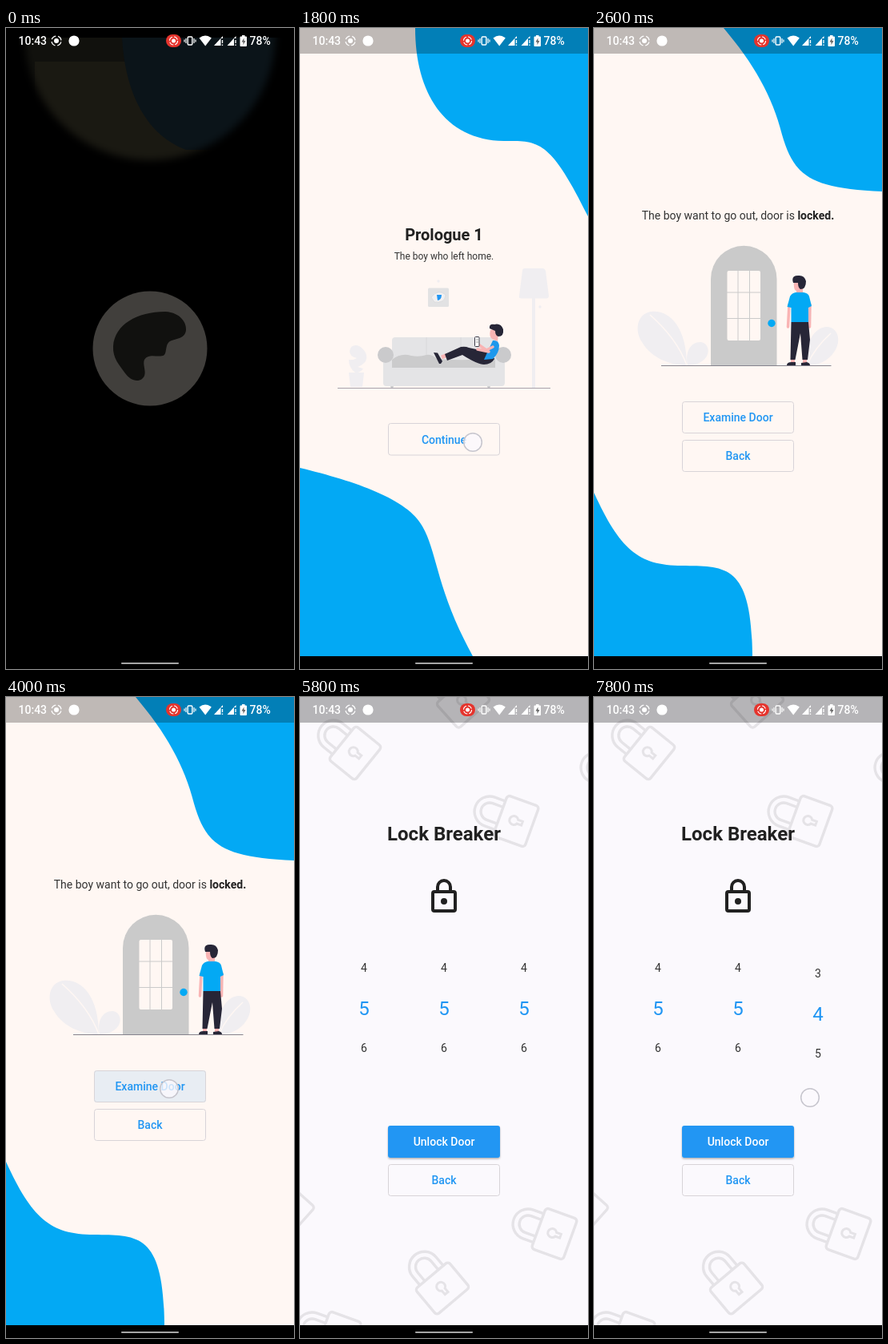
An HTML page that plays this animation: 360x800 px, repeating every 8 s.

```html
<!DOCTYPE html>
<html lang="en">
<head>
<meta charset="utf-8">
<title>Escape story</title>
<style>
html, body { margin: 0; width: 100%; height: 100%; overflow: hidden; background: #000; }
svg { display: block; width: 100vw; height: 100vh; }
text { font-family: Roboto, "Liberation Sans", sans-serif; }
.mid text { text-anchor: middle; }
.label { font-size: 14px; font-weight: 500; fill: #2196f3; }
.box { fill: none; stroke: #d8d4d8; }
.sky { fill: #03a9f4; }
.dark { fill: #272637; }
.skin { fill: #f9b4b4; }
.pale { fill: #f0eef1; }
.line { fill: none; }
</style>
</head>
<body>
<svg viewBox="0 0 360 800" preserveAspectRatio="none">
  <defs>
    <clipPath id="wheel"><rect x="40" y="313" width="280" height="150"/></clipPath>
    <filter id="soft" x="-20%" y="-20%" width="140%" height="140%"><feGaussianBlur stdDeviation="5"/></filter>
    <mask id="glow"><circle cx="180" cy="8" r="157" fill="#fff" filter="url(#soft)"/></mask>
    <filter id="lift" x="-10%" y="-10%" width="120%" height="140%"><feDropShadow dx="0" dy="1.5" stdDeviation="1.2" flood-opacity=".3"/></filter>
    <path id="topBlob" d="M144 0C144 80 180 140 255 141C298 141 312 138 360 235V0Z"/>
    <g id="padlock" fill="none" stroke="#e5e3e7" stroke-width="3.4">
      <rect x="-27" y="-21" width="54" height="42" rx="4"/>
      <path d="M-19-21v-14a19 19 0 0 1 38 0v14M-11-21v-14a11 11 0 0 1 22 0v14"/>
      <path d="M-2.5 2a5.5 5.5 0 1 1 5 0v6h-5z" stroke-width="3"/>
    </g>
  </defs>
  <rect width="360" height="800"/>

  <g id="splash">
    <g mask="url(#glow)">
      <rect y="12" width="360" height="180" fill="#11110d"/>
      <rect x="36" y="42" width="324" height="150" fill="#1a1912"/>
      <path d="M145 12C149 85 178 135 225 152H360V12Z" fill="#0b1419"/>
    </g>
    <circle cx="180" cy="400" r="71.5" fill="#413f3c"/>
    <path d="M134 397C136 370 164 354 199 354C219 355 226 369 225 377C224 388 213 387 205 391C198 395 202 408 196 409C188 411 178 406 173 414C170 421 178 432 170 438C163 443 154 438 149 431C142 421 133 412 134 397Z" fill="#11110f"/>
  </g>

  <g id="intro" class="mid">
    <rect width="360" height="784" fill="#fff7f3"/>
    <use href="#topBlob" class="sky"/>
    <path class="sky" d="M0 549C70 566 135 588 153 622C172 655 170 700 216 784H0Z"/>
    <text x="180" y="265" font-size="20" font-weight="700" fill="#212121">Prologue 1</text>
    <text x="180" y="288.500" font-size="12" fill="#333">The boy who left home.</text>

    <g class="pale">
      <path d="M281 300H303Q306 300 307 303L311 334Q311 337.500 308 337.500H277Q273 337.500 274 334L278 303Q278 300 281 300Z"/>
      <rect x="290" y="337" width="4" height="112"/>
      <circle cx="300" cy="348" r="1.700"/>
      <circle cx="173" cy="316" r="1.700"/>
      <path d="M64 398Q71 393 78 400Q86 408 82 416Q78 421 72 423L79 425Q75 431 69 430Q61 424 61 414Q66 415 71 412Q62 410 62 403Z"/>
      <path d="M61 430H80L78 448H63Z"/>
    </g>
    <rect x="160" y="324.500" width="26" height="23.500" rx="1.500" fill="#e2e2e3"/>
    <path d="M164 336Q173 325 182 333Q181 344 168 342Z" fill="#f1f0f1" stroke="#d3d3d5" stroke-width=".6"/>
    <path d="M171 333H177Q177 339 172 340Z" fill="#2196f3"/>
    <g fill="#e4e4e6">
      <rect x="115" y="386" width="130" height="42" rx="4"/>
      <path d="M158 386v24M201 386v24" stroke="#d6d6d8" stroke-width=".8"/>
      <path d="M115 414Q126 405 139 409Q149 411 158 408Q165 407 171 413Q207 416 245 412V424H115Z" fill="#cbcbcc"/>
      <path d="M104 408H115V424H244V408H256V443Q256 447 252 447H108Q104 447 104 443Z"/>
      <g fill="#cacacc"><circle cx="107" cy="408" r="10"/><circle cx="254" cy="408" r="10"/>
      <path d="M113 447h4l-1 3h-2zM234 447h4l-1 3h-2z"/></g>
    </g>
    <path d="M47 449.500H313" stroke="#a7a2ac"/>
    <path d="M177 411L184 408" stroke="#f9b4b4" stroke-width="5"/>
    <path class="dark" d="M167 405L172 405.500L178 416L176 419H174Z"/>
    <path class="dark" d="M181 407L201 398Q207 397 211 399L239 405L243 413Q239 420 230 420Q222 420 203 408L184 415Z"/>
    <path class="skin" d="M238 377Q244 374 248 382L247 391L240 388Q236 385 238 377Z"/>
    <path class="dark" d="M237 375Q236 369 243 370Q251 368 254 376Q255 385 248 385Q244 384 244 378Z"/>
    <path class="sky" style="fill:#1e98ec" d="M241 390Q248 389 249 396Q249 406 241 413L230 414L234 405Z"/>
    <path d="M241 398L233 402L223 395M236 404L222 401" class="line" stroke="#f9b4b4" stroke-width="3.500" stroke-linejoin="round" stroke-linecap="round"/>
    <rect x="218.500" y="385.500" width="5.500" height="12" rx="1" fill="#fff" stroke="#3b3a47" stroke-width="1"/>
    <path d="M220 389h3M220 392h3" stroke="#777" stroke-width=".7"/>

    <rect id="introTap" x="110" y="493.500" width="140" height="40" rx="3" fill="#2196f3"/>
    <rect class="box" x="110.500" y="493.500" width="139" height="39.500" rx="3"/>
    <text class="label" x="180" y="518.500">Continue</text>
  </g>

  <g id="door" class="mid">
    <rect width="360" height="784" fill="#fff7f3"/>
    <path class="sky" d="M162 0C200 45 223 85 235 133C250 185 270 200 360 204V0Z"/>
    <path class="sky" d="M0 580C32 650 55 671 110 671C165 672 197 668 198 784H0Z"/>
    <text x="180" y="239" font-size="14" fill="#333">The boy want to go out, door is <tspan font-weight="700" fill="#212121">locked.</tspan></text>
    <g class="pale">
      <path d="M116 421C116 373 94 351 71 354C54 357 50 377 60 392C71 411 94 421 116 421Z"/>
      <path d="M117 421C113 403 122 391 134 392C143 394 145 404 140 411C135 418 126 421 117 421Z"/>
      <path d="M266 421C262 394 276 373 291 373C306 374 309 391 301 403C293 416 280 421 266 421Z"/>
    </g>
    <path d="M70 358Q104 388 116 421M296 381Q276 399 266 421" class="line" stroke="#fff7f3" stroke-width="1.500"/>
    <path d="M146 421V313a41 41 0 0 1 82.500 0V421Z" fill="#cacaca"/>
    <rect x="166.500" y="303" width="41.500" height="87" rx="2" fill="#fff7f3"/>
    <path d="M180 303v87M194.500 303v87M166 330h42M166 362.500h42" stroke="#cacaca"/>
    <circle class="sky" cx="222" cy="368.500" r="4.700"/>
    <path d="M84 421.500H296.500" stroke="#85838d"/>
    <path d="M244 345L242.500 373M270 345L269.500 373" stroke="#f9b4b4" stroke-width="3.500" stroke-linecap="round"/>
    <path class="skin" d="M250 316H261V333H253V328Q249 327 250 316ZM246 411h5v7h-5zM261 411h5v7h-5z"/>
    <path class="dark" d="M249 318Q246 309 255 309Q263 308 265 316Q265 326 258 326Q255 324 255 318Z"/>
    <path class="sky" d="M252 330H262Q268 331 269 335L272 347L268 349V367H246.500V349L241.500 348L245 335Q247 331 252 330Z"/>
    <path class="dark" d="M246.500 367H268L270 389L267 414H260.500L258 381L251.500 414H245.500Z"/>
    <path class="dark" d="M241 421Q241 417 247 417H252V421ZM259 421V418L266 417Q270 418 270 421Z"/>
    <rect id="doorTap" x="110" y="466" width="140" height="40" rx="3" fill="#2196f3"/>
    <rect class="box" x="110.500" y="466.500" width="139" height="39" rx="3"/>
    <text class="label" x="180" y="491">Examine Door</text>
    <rect class="box" x="110.500" y="514.500" width="139" height="39" rx="3"/>
    <text class="label" x="180" y="539">Back</text>
  </g>

  <g id="lock" class="mid">
    <rect width="360" height="784" fill="#fbf9fd"/>
    <g id="pads"></g>
    <text x="180" y="179" font-size="24" font-weight="700" fill="#212121">Lock Breaker</text>
    <g transform="translate(156 225) scale(2)" fill="none" stroke="#212121" stroke-width="2">
      <rect x="5" y="9" width="14" height="12" rx="1"/>
      <path d="M8 9V6a4 4 0 0 1 8 0V9"/>
      <circle cx="12" cy="15" r="2" fill="#212121" stroke="none"/>
    </g>
    <g id="digits" clip-path="url(#wheel)"></g>
    <rect x="110" y="535" width="140" height="40" rx="3" fill="#2196f3" filter="url(#lift)"/>
    <text class="label" style="fill:#fff" x="180" y="560">Unlock Door</text>
    <rect class="box" x="110.500" y="583.500" width="139" height="39" rx="3"/>
    <text class="label" x="180" y="608">Back</text>
  </g>

  <rect id="veil" width="360" height="784" opacity=".015"/>
  <circle id="touch" r="11.300" fill="#fbf9fc" fill-opacity=".78" stroke="#c6c5cd" stroke-width="1.500"/>
  <rect id="bar" width="360" height="32"/>
  <rect y="784" width="360" height="16"/>
  <rect x="144" y="792" width="72" height="1.700" rx=".8" fill="#bdbdbd"/>

  <g fill="#fff" font-size="14" font-weight="500">
    <text x="15.500" y="21">10:43</text>
    <text x="304.500" y="21">78%</text>
    <circle cx="63" cy="16" r="6" class="line" stroke="#fff" stroke-width="1.300" stroke-dasharray="6.400 3" stroke-dashoffset="-1.500"/>
    <circle cx="63" cy="16" r="3"/>
    <circle cx="85" cy="16" r="6.600"/>
    <rect x="200" y="8" width="19" height="16" rx="8" fill="#e5342d"/>
    <circle cx="209.500" cy="16" r="5" class="line" stroke="#fff" stroke-width="1.200" stroke-dasharray="5.800 2"/>
    <circle cx="209.500" cy="16" r="2.500"/>
    <rect x="227.200" y="11" width="5.600" height="10" rx="1" class="line" stroke="#fff" stroke-width="1.400"/>
    <path d="M225 13v6M235 13v6M223 14.500v3M237 14.500v3" stroke="#fff" stroke-width="1.200"/>
    <path d="M241.500 12.500Q249 6.500 256.800 12.500L249.200 22.500Z"/>
    <path d="M260 22L271 10V13H268.500V22ZM276.500 22L287.500 10V13H285V22Z"/>
    <path d="M270.500 15v4M270.500 20.500v1.500M287 15v4M287 20.500v1.500" stroke="#fff" stroke-width="1.300"/>
    <path d="M295 9h3.500v1.500h1.500q1 0 1 1V22q0 1-1 1h-6.500q-1 0-1-1V11.500q0-1 1-1H295Z"/>
    <path d="M297.500 12.500l-3 5h2v3.500l3-5h-2z" fill="#666"/>
  </g>
</svg>
<script>
const LOOP = 8000, STEP = 200, ROW = 50, CENTER = 388;
const $ = id => document.getElementById(id);
const add = (parent, tag, attrs) => {
  const el = document.createElementNS("http://www.w3.org/2000/svg", tag);
  for (const k in attrs) el.setAttribute(k, attrs[k]);
  return parent.appendChild(el);
};

// x, y, angle
[[69, 70, -51], [270, 155, -70], [318, 670, -70], [178, 738, -40], [204, 6, -42],
 [403, 100, -70], [-15, 643, -48], [48, 799, -70], [398, 815, -70]].forEach(([x, y, a]) =>
  add($("pads"), "use", { href: "#padlock", transform: `translate(${x} ${y}) rotate(${a})` }));

const columns = [80, 180, 280].map(x => [2, 3, 4, 5, 6, 7].map(value => {
  const el = add($("digits"), "text", { x });
  el.textContent = value;
  return { el, value };
}));

// Linear value at time t from [time, value] pairs
function track(keys, t) {
  if (t <= keys[0][0]) return keys[0][1];
  for (let i = 1; i < keys.length; i++) {
    const [t0, a] = keys[i - 1], [t1, b] = keys[i];
    if (t <= t1) return a + (b - a) * (t - t0) / (t1 - t0);
  }
  return keys[keys.length - 1][1];
}

const middle = [[4800, 0], [5000, 12], [5200, 17], [5600, 0], [6000, 0], [6200, 14], [6400, 42], [6600, 71], [6800, 56], [7200, 0]];
const right = [[7200, 0], [7400, 10], [7600, 34], [7800, 57]];

// Finger contacts: start, end, x(t), y(t)
const still = v => () => v;
const touches = [
  [1600, 2000, still(216), still(517)],
  [3800, 4200, still(204), still(489)],
  [4800, 5600, still(186), t => 430 + track(middle, t)],
  [6200, 7200, still(224), t => 333 + track(middle, t)],
  [7400, 8000, still(270), t => 443 + track(right, t)]
];

function enter(el, start, t) {
  const p = Math.max(0, Math.min(1, (t - start) / 400));
  el.setAttribute("opacity", p);
  el.setAttribute("transform", `translate(0 ${50 * (1 - p) ** 2})`);
}

function spin(column, offset) {
  for (const { el, value } of column) {
    const y = CENTER + (value - 5) * ROW + offset;
    const big = Math.abs(y - CENTER) <= ROW / 2;
    el.setAttribute("y", y + (big ? 8.5 : 5));
    el.setAttribute("font-size", big ? 24 : 14);
    el.setAttribute("fill", big ? "#2196f3" : "#333");
  }
}

function draw(t) {
  const show = (id, on) => $(id).setAttribute("visibility", on ? "visible" : "hidden");
  show("splash", t < 200);
  show("intro", t >= 200 && t < 2400);
  show("door", t >= 2000 && t < 4600);
  show("lock", t >= 4200);
  show("veil", t >= 200 && t < 400);
  show("bar", t >= 200);
  enter($("door"), 2000, t);
  enter($("lock"), 4200, t);
  $("bar").setAttribute("opacity", t < 4400 ? .25 : .28);
  $("introTap").setAttribute("opacity", t >= 2000 ? .1 : 0);
  $("doorTap").setAttribute("opacity", t >= 4000 ? .1 : 0);

  [0, track(middle, t), track(right, t)].forEach((offset, i) => spin(columns[i], offset));

  const touch = touches.find(([start, end]) => t >= start && t < end);
  show("touch", touch);
  if (touch) {
    $("touch").setAttribute("cx", touch[2](t));
    $("touch").setAttribute("cy", touch[3](t));
  }
}

const begin = performance.now();
function tick() {
  const t = (performance.now() - begin) % LOOP;
  draw(Math.floor(t / STEP) * STEP);
  requestAnimationFrame(tick);
}
tick();
</script>
</body>
</html>
```
